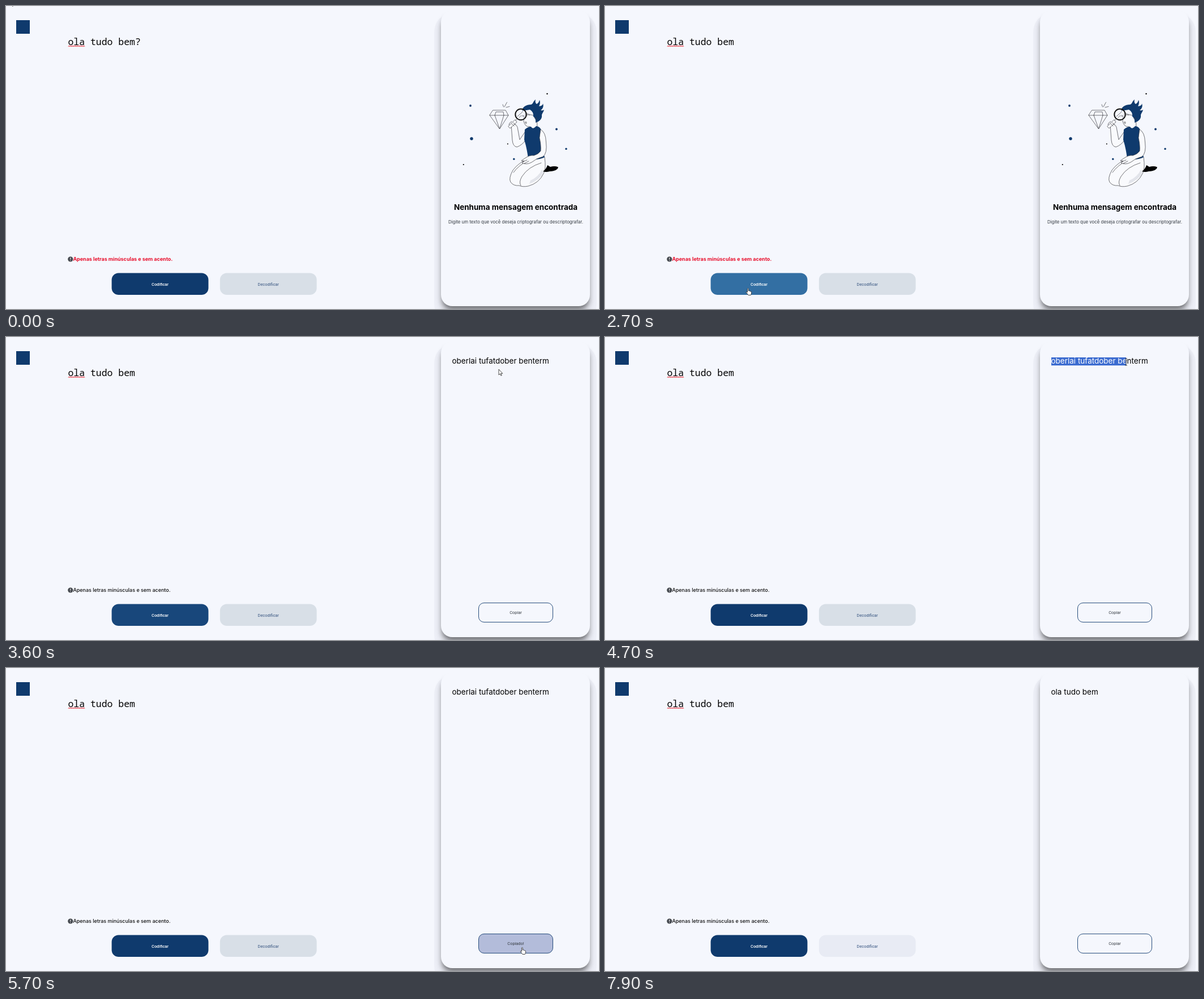
Recreate the animation shown at these times as an HTML page. Size 1047 by 535 pixels, loop 8000 ms.

```html
<!DOCTYPE html>
<html lang="pt">
<head>
<meta charset="utf-8">
<title>Codificador de texto</title>
<style>
  html, body { margin: 0; width: 100%; height: 100%; overflow: hidden; background: #f5f7fd; }
  #card {
    position: absolute; left: 768px; top: 8px; width: 263px; height: 522px;
    border-radius: 20px; background: #f5f7fd;
    box-shadow: 0 8px 9px -3px rgba(0,0,0,.42), 0 11px 12px rgba(0,0,0,.2), 0 17px 0 12px rgba(20,20,60,.03);
  }
  svg { position: absolute; left: 0; top: 0; }
  text { font-family: Inter, sans-serif; white-space: pre; }
  .mono { font: 16.47px "Noto Sans Mono", monospace; }
  .btn { font: 7.4px Roboto, Arial, sans-serif; text-anchor: middle; }
  .menu { font: 5.8px "Open Sans", sans-serif; fill: #e4e2e8; }
  .mid { text-anchor: middle; }
  .result { font-size: 13.5px; }
  .line { fill: none; stroke: #3a3a3e; stroke-width: .7; stroke-linejoin: round; stroke-linecap: round; }
  .skin { fill: #f9fafd; }
  .navy { fill: #0f3a6d; }
</style>
</head>
<body>
<div id="card"></div>
<svg width="1047" height="535" viewBox="0 0 1047 535">
  <rect class="navy" x="18" y="25" width="24" height="24"/>

  <text id="input" class="mono" x="109.5" y="69"></text>
  <path id="squiggle" fill="none" stroke="#e8232f" stroke-width=".9"/>
  <rect id="caret" y="53" width="1" height="20.5" fill="#111"/>

  <circle cx="113.8" cy="447" r="4.6" fill="#45494f"/>
  <path d="M113.8 444.2v3.2M113.8 448.7v1.1" stroke="#fff" stroke-width="1.1"/>
  <text id="warn" x="118.4" y="450.2" font-size="8.96">Apenas letras minúsculas e sem acento.</text>

  <rect id="encode" x="186.600" y="471.600" width="170.800" height="38.300" rx="12"/>
  <text class="btn" x="272" y="493.600" fill="#fff" style="font-weight:500">Codificar</text>
  <rect id="decode" x="377.800" y="471.600" width="170.800" height="38.300" rx="12"/>
  <text class="btn" x="463.200" y="493.600" fill="#35537f">Decodificar</text>

  <g id="empty">
    <g class="navy">
      <circle cx="820" cy="176" r="1.9"/><circle cx="822" cy="234.3" r="2.7"/>
      <circle cx="896.8" cy="270.3" r="1.7"/><circle cx="972" cy="217.5" r="1.9"/>
      <circle cx="989" cy="252.2" r="1.7"/>
    </g>
    <circle cx="955.5" cy="155" r="1.2"/><circle cx="885.8" cy="243.5" r="1"/><circle cx="807.8" cy="280" r="1.1"/>

    <path class="line" d="M860 184H882L887 193 871.500 217 854 193ZM854 193H887M863 193L871.500 217 879 193M863 193L865 187H878L879 193M877 174L878.500 178M880 178L884.500 170M883 179L889 177.500"/>

    <path class="line skin" d="M926 267Q904 277 895 290 887 304 891 311 896 318 906 317 912 320 922 318 941 313 949 296 954 288 951 267Z"/>
    <path class="line" d="M945 277Q922 284 911 301 905 311 909 317M924 271Q904 282 896 294"/>
    <path d="M926 308Q940 302 946 289L949 295Q941 308 924 314Z" fill="#e3e5eb"/>
    <path d="M948 292Q954 288 956 281L961 284Q969 282 975 284.500 974 291 960 292 953 294 948 292Z"/>

    <path class="line skin" d="M918 220L907 236 903 214Q900 206 892 209L894 237Q895 248 902 249 911 246 918 236Z"/>
    <path class="line skin" d="M917 190Q914 196 914 203 916 214 925 213L928 219 938 214 937 195Z"/>
    <path class="navy" d="M916 218Q922 213 927 213 930 219 936 212 943 213 945 219L944 239 951 267Q939 273 922 270 920 252 915 236Z"/>
    <path class="line skin" d="M944 218Q953 223 953.500 240 956 260 948 266 936 269 928 276 919 281 911 277L915 274 910 273 916 269Q924 263 932 264 941 261 944 256 945 246 942 233Z"/>
    <path class="line" d="M912 275L920 272M915 278L923 274"/>
    <path class="navy" d="M911 186C911 178 919 174 927 174 931 173 930 169 935 165 934 169 935 172 937 173 941 171 941 168 942 166 944 171 942 175 941 177 946 177 948 174 948 172 950 178 947 182 944 184 947 185 949 184 950 183 949 188 946 190 946 193 947 199 942 204 935 206Q936 199 931 195 932 187 925 183 917 184 911 186Z"/>
    <path class="line" d="M919 193Q921 191 925 193M917 205Q919 203 919 207 917 209 917 205M933 198Q937 194 937 201"/>

    <circle cx="909" cy="191.500" r="9.700" fill="#f5f7fd" fill-opacity=".6" stroke="#111" stroke-width="2"/>
    <path class="line" d="M903 195L912 187M906 197L910 193M911 195Q914 190 914 196"/>
    <path class="line" stroke-width="2" d="M902.500 199L899 203"/>
    <path class="line skin" d="M899 201L902 205 890 216 887 213ZM893 204Q889 205 888 210M896 206L899 210M893 208L897 212"/>

    <text class="mid" x="900" y="359.800" font-size="13.48" font-weight="700">Nenhuma mensagem encontrada</text>
    <text class="mid" x="900" y="384" font-size="7.86" fill="#343a40">Digite um texto que você deseja criptografar ou descriptografar.</text>
  </g>

  <g id="output">
    <text id="result" class="result" x="787.500" y="47"></text>
    <clipPath id="clip"><rect id="selection" x="788" y="36" height="14.500"/></clipPath>
    <g clip-path="url(#clip)">
      <rect x="788" y="36" width="172" height="14.500" fill="#3b6bd0"/>
      <text class="result" x="787.500" y="47" fill="#fff">oberlai tufatdober benterm</text>
    </g>
    <rect id="copy" x="834.500" y="469.500" width="131" height="34" rx="9.500" stroke="#274d7c"/>
    <text id="copyLabel" class="btn" x="900" y="489.200" fill="#343a40"></text>
  </g>

  <g id="popup">
    <path d="M811 0H936V24Q936 26 934 26H878.500L873.500 31 868.500 26H813Q811 26 811 24Z" fill="#3a3541"/>
    <rect x="818" width="37" height="1" fill="#5c3f8e"/>
    <path d="M851.500 12V20M888.500 12V20" stroke="#5a5562" stroke-width=".8"/>
    <text class="menu" x="818.300" y="18.400">Pesquisar</text>
    <text class="menu" x="861" y="18.400">Copiar</text>
    <text class="menu" x="896" y="18.400">Instantâneo</text>
  </g>

  <path id="pointer" stroke="#222" stroke-width=".8" stroke-linejoin="round"/>
</svg>
<script>
const $ = id => document.getElementById(id);
const LOOP = 8000;

const shapes = {
  arrow: 'M0 0V10L2.300 7.900 3.900 11.300 5.300 10.700 3.800 7.400H6.800Z',
  hand: 'M2.500 1Q3.500-.3 4.300 1V5Q6 4.200 6.400 5.400 8 5 8.200 6.300 9.600 6 9.600 7.500 9.800 10 8.300 12.500H4Q2.500 10 .4 8 0 6.500 1.500 6.700L2.500 7.600Z',
  beam: 'M-2-6H2M0-6V6M-2 6H2'
};

// Pointer stops: time, shape, x, y; each holds until the next.
const stops = [
  [0, 'arrow', 7.5, -10.8], [200, 'arrow', 60, 18], [300, 'beam', 150, 46], [400, 'beam', 250, 63],
  [1000], [2200, 'arrow', 249, 464], [2300, 'hand', 249, 498],
  [3200, 'hand', 320, 476], [3300, 'arrow', 480, 400], [3400, 'arrow', 650, 270],
  [3500, 'arrow', 790, 130], [3600, 'arrow', 870, 57], [3700, 'arrow', 820, 22],
  [3900, 'beam', 816, 34], [4000, 'beam', 808, 40], [4100, 'beam', 800, 45],
  [4200, 'beam', 794, 47], [4300, 'beam', 790, 45], [4400, 'beam', 788, 44],
  [4600, 'beam', 850, 44], [4700, 'beam', 920, 44], [4800, 'beam', 968, 44],
  [5000, 'arrow', 971, 90], [5100, 'arrow', 973, 270], [5200, 'arrow', 957, 407],
  [5300, 'arrow', 938, 452], [5400, 'hand', 920, 478], [5500, 'hand', 908, 493],
  [6100, 'hand', 870, 484], [6200, 'arrow', 790, 445], [6300, 'arrow', 690, 405],
  [6400, 'arrow', 600, 386], [6500, 'arrow', 525, 430], [6600, 'hand', 480, 476],
  [6700, 'hand', 464, 488], [6800, 'hand', 459, 492], [7800, 'arrow', 459, 446], [7900]
];

const ramp = (t, a, b) => Math.min(1, Math.max(0, (t - a) / (b - a)));
const mix = (from, to, k) => `rgb(${from.map((v, i) => Math.round(v + (to[i] - v) * k))})`;
const show = (id, on) => $(id).style.display = on ? '' : 'none';

let wave = 'M110 72';
for (let i = 0; i < 10; i++) wave += 'l1.45-2.200 1.45 2.200';
$('squiggle').setAttribute('d', wave);

function drawPointer(t) {
  const [, kind, x, y] = stops.findLast(s => s[0] <= t);
  show('pointer', kind);
  if (!kind) return;
  const p = $('pointer');
  p.setAttribute('d', shapes[kind]);
  p.setAttribute('transform', `translate(${x} ${y})`);
  p.setAttribute('fill', kind === 'beam' ? 'none' : '#fff');
}

function draw(t) {
  const done = t >= 2800, decoded = t >= 7400;

  $('input').textContent = t < 1600 ? 'ola tudo bem?' : 'ola tudo bem';
  show('caret', (t >= 900 && t < 1500) || (t >= 1900 && t < 2500));
  $('caret').setAttribute('x', t < 1600 ? 237.3 : 227.5);

  $('warn').setAttribute('fill', done ? '#111' : '#e80f2c');
  $('warn').setAttribute('font-weight', done ? 500 : 700);

  $('encode').style.fill = mix([15, 58, 109], [51, 111, 163], ramp(t, 2400, 2700) - ramp(t, 3300, 3700));
  $('decode').style.fill = mix([216, 223, 231], [232, 235, 244], ramp(t, 6500, 6800));
  $('copy').style.fill = mix([245, 247, 253], [179, 188, 218], ramp(t, 5300, 5600) - ramp(t, 6100, 6400));

  show('empty', !done);
  show('output', done);
  $('result').textContent = decoded ? 'ola tudo bem' : 'oberlai tufatdober benterm';
  $('copyLabel').textContent = t >= 5600 && !decoded ? 'Copiado!' : 'Copiar';

  const end = t < 4600 || t >= 5600 ? 788 : t < 4700 ? 850 : t < 4800 ? 920 : 960;
  $('selection').setAttribute('width', end - 788);
  show('popup', t >= 5000 && t < 5600);
  drawPointer(t);
}

const start = performance.now();
function tick() {
  // The screen updates ten times a second.
  draw(Math.floor((performance.now() - start) % LOOP / 100) * 100);
  requestAnimationFrame(tick);
}
tick();
</script>
</body>
</html>
```
